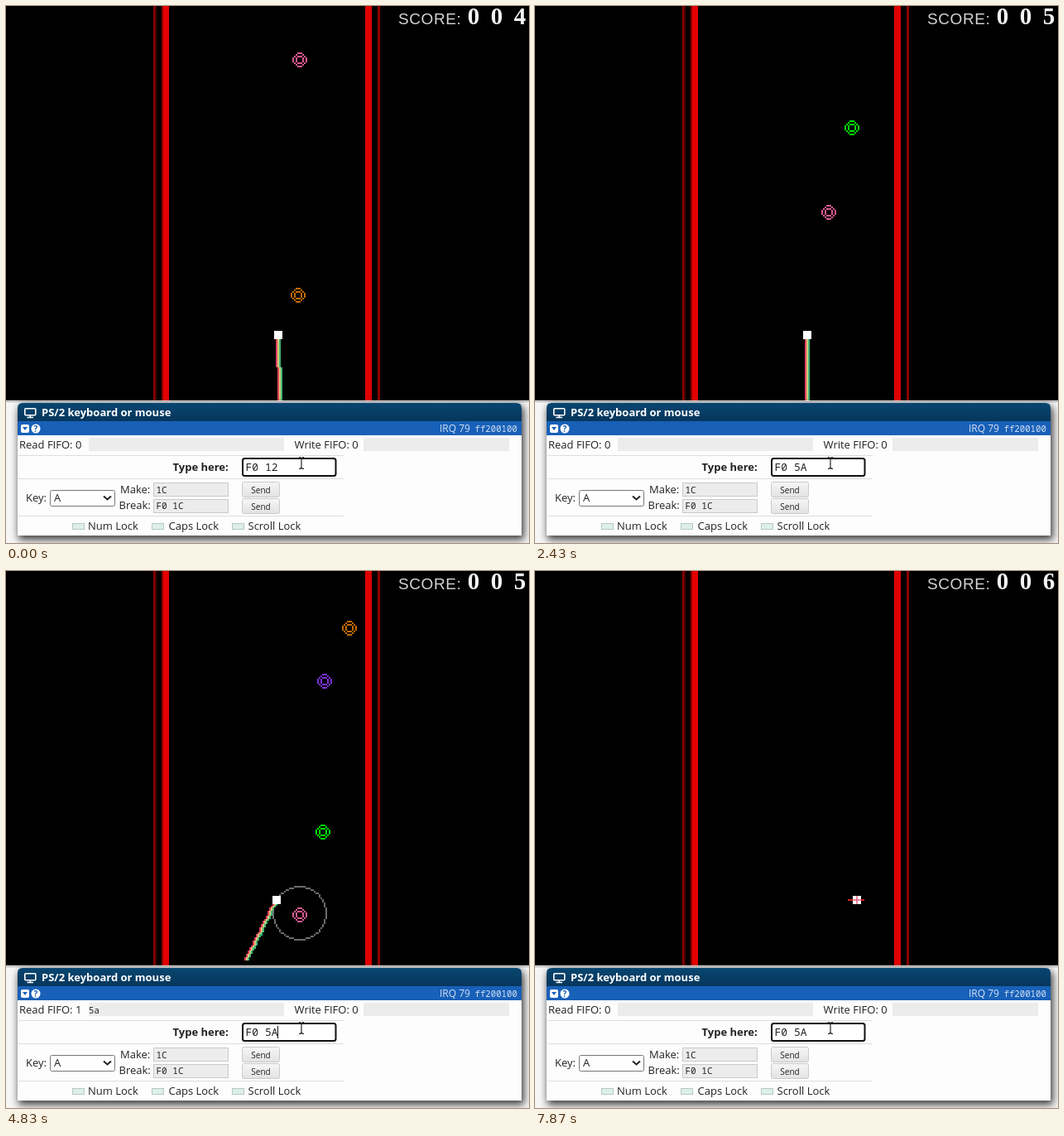
An HTML page with a canvas that plays this animation: 632 px wide and 648 px high, repeating every 8000 ms.

```html
<!DOCTYPE html>
<html lang="en">
<head>
<meta charset="utf-8">
<title>Orbit game</title>
<style>
html, body { margin: 0; width: 100%; height: 100%; overflow: hidden; background: #f6f6f6; }
#stage { position: relative; width: 632px; height: 648px; overflow: hidden; background: #f6f6f6; }
canvas, svg { position: absolute; left: 0; top: 0; }
#edge { position: absolute; top: 476px; width: 632px; height: 1px; background: #fff; border-bottom: 1px solid #a8a8a8; }
#panel {
  position: absolute; left: 14px; top: 479px; width: 609px; height: 160px;
  border-radius: 6px 6px 0 0; background: #fdfdfd; box-shadow: 2px 4px 10px 1px rgba(0, 0, 0, .75);
}
text { font: 13px "Open Sans", sans-serif; fill: #222; white-space: pre; }
.bold { font-weight: 700; }
.mono { font: 11px "Noto Sans Mono", monospace; }
.label { font: 19px "Liberation Sans", sans-serif; letter-spacing: .6px; fill: #d4d4d4; }
.digit { font: bold 29px "Liberation Serif", serif; text-anchor: middle; fill: #f4f4f4; }
.field { fill: #ececec; }
.box { fill: #ececec; stroke: #cacaca; }
.rule { stroke: #dedede; }
.led { fill: #dcf0e8; stroke: #b8c8c4; }
.btn rect { fill: url(#face); stroke: #cacaca; }
.btn text { font-size: 10px; text-anchor: middle; }
</style>
</head>
<body>
<div id="stage">
  <canvas id="game" width="632" height="476"></canvas>
  <div id="edge"></div>
  <div id="panel"></div>
  <svg width="632" height="648" viewBox="0 0 632 648">
    <defs>
      <linearGradient id="head" x2="0" y2="1"><stop stop-color="#084670"/><stop offset="1" stop-color="#06365c"/></linearGradient>
      <linearGradient id="face" x2="0" y2="1"><stop stop-color="#f6f6f6"/><stop offset="1" stop-color="#e2e2e2"/></linearGradient>
    </defs>

    <text class="label" x="474" y="22">SCORE:</text>
    <text class="digit" x="565" y="22">0</text>
    <text class="digit" x="593" y="22">0</text>
    <text class="digit" id="score" x="621" y="22">4</text>

    <path d="M14 501v-16q0-6 6-6h597q6 0 6 6v16z" fill="url(#head)"/>
    <g fill="none" stroke="#fff" stroke-width="1.6"><rect x="22.8" y="485.8" width="13" height="8" rx="1"/><path d="M29.3 494v2.500M25.500 496.500h7.500"/></g>
    <text class="bold" x="43" y="495" style="fill:#fff">PS/2 keyboard or mouse</text>
    <rect x="14" y="501" width="609" height="17" fill="#1860b8"/>
    <rect x="18" y="505" width="10" height="10" rx="2" fill="#fff"/>
    <path d="M20 508h6l-3 4z" fill="#1860b8"/>
    <circle cx="36" cy="510" r="5.5" fill="#fff"/>
    <text class="bold" x="33.500" y="514" style="font-size:10px;fill:#1860b8">?</text>
    <text x="524" y="514" style="font-size:12px;fill:#d4e2f4">IRQ 79</text>
    <text class="mono" x="566.500" y="514" style="font-size:10.700px;fill:#d4e2f4">ff200100</text>

    <rect class="field" x="100" y="521" width="236" height="16"/>
    <rect class="field" x="432" y="521" width="176" height="16"/>
    <text id="count" x="16" y="534">Read FIFO: 0</text>
    <text class="mono" id="fifo" x="100" y="534" style="font-size:10.700px"></text>
    <text x="348.500" y="534">Write FIFO: 0</text>
    <path class="rule" d="M15 542.500h393M15 570.500h393M15 615.500h393"/>

    <text class="bold" x="201.500" y="561">Type here:</text>
    <rect x="286" y="546" width="112.500" height="21" rx="2.500" fill="#fff" stroke="#101010" stroke-width="2"/>
    <text class="mono" id="typed" x="289.500" y="561" style="font-size:13px">F0 12</text>
    <rect id="caret" y="549" width="1" height="15" fill="#111"/>
    <path d="M354 544.500q3 0 3 2 0-2 3-2M357 546v11M354 558.500q3 0 3-2 0 2 3 2" fill="none" stroke="#222" stroke-width="1.200"/>

    <text x="24" y="598">Key:</text>
    <rect x="53.500" y="584.500" width="78" height="19" rx="2" fill="#fff" stroke="#777"/>
    <text x="58" y="598">A</text>
    <path d="M118 591.500l4.500 4 4.500-4" fill="none" stroke="#222" stroke-width="2"/>
    <text x="138" y="588">Make:</text>
    <text x="136.500" y="607">Break:</text>
    <rect class="box" x="178.500" y="575.500" width="90" height="16"/>
    <rect class="box" x="178.500" y="595.500" width="90" height="16"/>
    <text class="mono" x="181.500" y="588">1C</text>
    <text class="mono" x="181.500" y="607">F0 1C</text>
    <g class="btn"><rect x="285.500" y="574.500" width="45" height="18" rx="2"/><text x="308" y="587.500">Send</text></g>
    <g class="btn"><rect x="285.500" y="594.500" width="45" height="18" rx="2"/><text x="308" y="607.500">Send</text></g>

    <rect class="led" x="80.500" y="624.500" width="14" height="7"/>
    <text x="99" y="632">Num Lock</text>
    <rect class="led" x="176.500" y="624.500" width="14" height="7"/>
    <text x="196.500" y="632">Caps Lock</text>
    <rect class="led" x="273.500" y="624.500" width="14" height="7"/>
    <text x="292.500" y="632">Scroll Lock</text>
  </svg>
</div>
<script>
const LOOP = 8000, CELL = 2, HEAD_Y = 198, TAIL = 40, BLINK = 530;
const CLEAR = 7000, BURST = 7730;
const TAPS = [500, 4800];
const byId = id => document.getElementById(id);
const ctx = byId("game").getContext("2d");

// All game positions are in cells of 2 by 2 pixels.
const SCROLL = [[0, 0], [1600, 61], [3270, 123.5], [4830, 175.5], [5530, 198.5], [6270, 223.5], [6450, 224.3], [6650, 221]];
const STEER = [[4830, 163.1], [5530, 176.1], [6150, 185], [6270, 187.1], [6650, 194]];
const TURN = [[6150, 26.9], [6270, 62], [6650, 120]];
const BALLS = [
  { x: 176, y: 174, color: "#c06800" },
  { x: 177, y: 32, color: "#d8588c" },
  { x: 191, y: -18.5, color: "#00e400" },
  { x: 192, y: -109.5, color: "#7a30d8" },
  { x: 207, y: -141.5, color: "#c06800" }
];
const ORBITS = [
  { from: 500, to: 620, ball: 0, r: 12 },
  { from: 4800, to: 4920, ball: 1, r: 16 },
  { from: 6150, to: CLEAR, ball: 2, r: 7 }
];

function track(points, t) {
  if (t <= points[0][0]) return points[0][1];
  for (let i = 1; i < points.length; i++) {
    const [t0, a] = points[i - 1], [t1, b] = points[i];
    if (t < t1) return a + (b - a) * (t - t0) / (t1 - t0);
  }
  return points[points.length - 1][1];
}

function cells(x, y, w, h, color) {
  ctx.fillStyle = color;
  ctx.fillRect(x * CELL, y * CELL, w * CELL, h * CELL);
}

function ring(cx, cy, r, color) {
  for (let x = 0; x <= r; x++) {
    const y = Math.round(Math.sqrt(r * r - x * x));
    if (x >= y) break;
    for (const [a, b] of [[x, y], [y, x]])
      for (const sx of [-1, 1])
        for (const sy of [-1, 1]) cells(cx + sx * a, cy + sy * b, 1, 1, color);
  }
}

function bar(x, w, color) {
  ctx.fillStyle = color;
  ctx.fillRect(x, 0, w, 476);
}

function rails() {
  bar(178, 2, "#8c0000");
  bar(180, 2, "#4c0000");
  bar(188, 2, "#900000");
  bar(190, 7, "#e40000");
  bar(434, 8, "#e00000");
  bar(449, 3, "#8c0000");
}

function tail(x, t) {
  let dx = 0.3, dy = TAIL;
  if (t >= TAPS[1]) {
    const a = track(TURN, t) * Math.PI / 180;
    dx = -TAIL * Math.sin(a);
    dy = TAIL * Math.cos(a);
  }
  const x0 = Math.round(x), x1 = Math.round(x + dx);
  ["#e04060", "#d8c878", "#40b878"].forEach((color, k) => {
    for (let i = 0; i <= TAIL; i++) {
      const px = Math.round(x0 + (x1 - x0) * i / TAIL);
      cells(px + k - 1, Math.round(HEAD_Y + dy * i / TAIL), 1, 1, color);
    }
  });
}

function burst(x, t) {
  const reach = Math.min(5, 3 + Math.floor((t - BURST) / 35));
  cells(x - reach, HEAD_Y, reach * 2, 1, "#d02020");
  cells(x - 2, HEAD_Y - 2, 5, 5, "#fff");
  cells(x - 2, HEAD_Y, 5, 1, "#f08a98");
  cells(x, HEAD_Y - 2, 1, 5, "#f08a98");
  cells(x, HEAD_Y, 1, 1, "#d860a0");
}

function drawGame(t) {
  ctx.fillStyle = "#000";
  ctx.fillRect(0, 0, 632, 476);
  rails();
  const s = track(SCROLL, t);
  const x = t < 4830 ? 164.4 - 0.0075 * s : track(STEER, t);
  if (t < CLEAR) {
    for (const o of ORBITS) {
      const b = BALLS[o.ball];
      if (t >= o.from && t < o.to) ring(b.x, Math.floor(b.y + s) - 1, o.r, "#6c6c6c");
    }
    for (const b of BALLS) {
      const y = Math.floor(b.y + s);
      if (y > 220) continue;
      ring(b.x, y, 4, b.color);
      ring(b.x, y, 2, b.color);
    }
    tail(x, t);
  }
  const hx = Math.round(x);
  if (t >= BURST) burst(hx, t);
  else cells(hx - 2, HEAD_Y - 2, 5, 5, "#fff");
}

function drawPanel(t) {
  const tap = TAPS.filter(p => t >= p).pop();
  const age = tap === undefined ? -1 : t - tap;
  const queued = age >= 0 && age < 65;
  const text = tap === undefined || (tap === TAPS[0] && queued) ? "F0 12"
    : age >= 65 && age < 140 ? "5A" : "F0 5A";
  byId("score").textContent = t < 1180 ? 4 : t < 5200 ? 5 : 6;
  byId("count").textContent = "Read FIFO: " + (queued ? 1 : 0);
  byId("fifo").textContent = queued ? "5a" : "";
  byId("typed").textContent = text;
  byId("caret").setAttribute("x", Math.round(289 + 7.8 * text.length));
  byId("caret").style.opacity = age >= 0 && Math.floor(age / BLINK) % 2 === 0 ? 1 : 0;
}

const start = performance.now();
function frame() {
  const t = (performance.now() - start) % LOOP;
  drawGame(t);
  drawPanel(t);
  requestAnimationFrame(frame);
}
frame();
</script>
</body>
</html>
```
